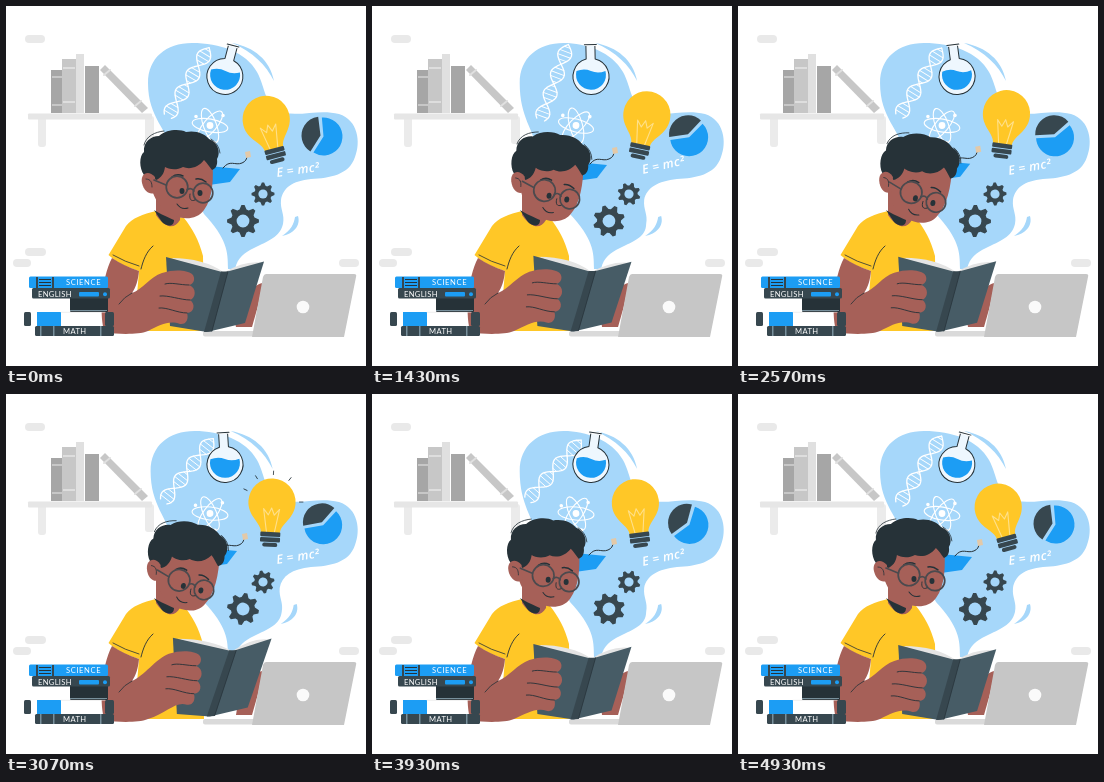
These frames come from a looping animation (360 px wide and 360 px high, 5 s). An HTML page with a canvas:

```html
<!DOCTYPE html>
<html lang="en">
<head>
<meta charset="utf-8">
<title>Studying</title>
<style>
html, body { margin: 0; width: 100%; height: 100%; overflow: hidden; background: #fff; }
canvas { display: block; width: 360px; height: 360px; }
</style>
</head>
<body>
<canvas id="stage"></canvas>
<script>
const LOOP = 5000, TAU = Math.PI * 2;
const canvas = document.getElementById('stage');
const ctx = canvas.getContext('2d');
const ratio = window.devicePixelRatio || 1;
canvas.width = canvas.height = 360 * ratio;

const INK = '#263238', SLATE = '#455a64', STEEL = '#37474f', BLUE = '#1c9df4';
const SKY = '#a6d7fa', YELLOW = '#ffc727', SKIN = '#a66058', WHITE = '#fff';

// Smooth periodic interpolation through six poses
const KEYS = [0, 570, 1430, 2070, 3070, 3930];
function track(values, t) {
  const n = KEYS.length;
  const wrap = k => (k + n) % n;
  const time = k => KEYS[wrap(k)] + LOOP * Math.floor(k / n);
  const slope = k => (values[wrap(k + 1)] - values[wrap(k - 1)]) / (time(k + 1) - time(k - 1));
  let i = n - 1;
  while (KEYS[i] > t) i--;
  const span = time(i + 1) - time(i), u = (t - time(i)) / span, v = 1 - u;
  return values[i] * (1 + 2 * u) * v * v + slope(i) * span * u * v * v
    + values[wrap(i + 1)] * u * u * (3 - 2 * u) - slope(i + 1) * span * u * u * v;
}
const pulse = (t, period) => (1 - Math.cos(TAU * t / period)) / 2;
const rad = deg => deg * Math.PI / 180;

function fill(d, color) {
  ctx.fillStyle = color;
  ctx.fill(new Path2D(d));
}
function line(d, color = INK, width = 1) {
  ctx.strokeStyle = color;
  ctx.lineWidth = width;
  ctx.stroke(new Path2D(d));
}
function box(x, y, w, h, color, r = 0) {
  ctx.fillStyle = color;
  ctx.beginPath();
  ctx.roundRect(x, y, w, h, r);
  ctx.fill();
}
function disc(x, y, r, color) {
  ctx.fillStyle = color;
  ctx.beginPath();
  ctx.arc(x, y, r, 0, TAU);
  ctx.fill();
}
function ring(x, y, rx, ry, turn, color, width) {
  ctx.strokeStyle = color;
  ctx.lineWidth = width;
  ctx.beginPath();
  ctx.ellipse(x, y, rx, ry, turn, 0, TAU);
  ctx.stroke();
}
function text(label, x, y, font, spacing = 0) {
  ctx.font = font;
  ctx.letterSpacing = spacing + 'px';
  ctx.fillStyle = WHITE;
  ctx.fillText(label, x, y);
}
function place(x, y, turn, draw) {
  ctx.save();
  ctx.translate(x, y);
  ctx.rotate(turn);
  draw();
  ctx.restore();
}

function drawRoom() {
  box(19, 29, 20, 8, '#e9e9e9', 4);
  box(19, 242, 21, 8, '#e9e9e9', 4);
  box(7, 253, 18, 8, '#e9e9e9', 4);
  box(333, 253, 20, 8, '#e9e9e9', 4);
  box(32, 110, 8, 31, '#ebebeb', 3);
  box(139, 110, 9, 28, '#ebebeb', 3);
  box(22, 107.5, 124, 6, '#e6e6e6', 1);
  box(45, 64, 11, 43, '#a6a6a6');
  box(46, 70, 10, 2, '#c7c7c7');
  box(46, 98, 10, 2, '#c7c7c7');
  box(56, 53, 14, 54, '#c7c7c7');
  box(57, 61, 12, 2, '#dedede');
  box(57, 95, 12, 2, '#dedede');
  box(70, 48, 8, 59, '#e0e0e0');
  box(79, 60, 14, 47, '#a6a6a6');
  fill('M94 64 L99 59 L142 102 L136 107Z', '#c7c7c7');
  line('M98 69L104 64 M129 100L135 95', '#e0e0e0', 2);
}

function drawBubble(t) {
  const d = 6 * pulse(t, 2500);
  fill(`M${142 + d} 77 C${142 + d} 52 ${160 + d} 37 ${186 + d} 37 C214 37 240 46 251 66
    C260 82 258 102 278 107 C298 110 314 103 333 108 C352 114 355 136 349 151
    C343 169 324 172 305 173 C286 175 ${277 - d / 2} 182 ${275 - d / 2} 194
    C${274 - d / 2} 204 ${279 - d / 2} 208 ${277 - d / 2} 218
    C274 231 262 235 248 242 C238 247 232 251 229 263 H222
    C222 245 221 233 198 208 L165 145 C162 123 ${142 + d} 112 ${142 + d} 77Z`, SKY);
  place(-d / 2, 0, 0, () => {
    fill('M226 37 C248 41 264 54 268 75 C260 59 247 46 226 37Z', SKY);
    fill('M292 210 C295 220 287 228 276 230 C285 224 288 218 289 211Z', SKY);
  });
}

function drawDna(t) {
  place(182.5, 76, rad(31 - 11 * Math.sin(TAU * t / LOOP)), () => {
    const wave = y => 7 * Math.sin((y + 40) / 80 * TAU * 1.9);
    for (const side of [1, -1]) {
      ctx.beginPath();
      for (let y = -40; y <= 40; y += 2) ctx.lineTo(side * wave(y), y);
      ctx.strokeStyle = WHITE;
      ctx.lineWidth = 1.3;
      ctx.stroke();
    }
    for (let y = -37; y < 40; y += 4.6) line(`M${-wave(y)} ${y}H${wave(y)}`, WHITE, 0.9);
  });
}

function drawFlask(t) {
  const tilt = rad(3.5 + 11.5 * Math.cos(TAU * (t + 150) / LOOP));
  place(219, 70, tilt, () => {
    const outline = 'M-4.5 -31 V-17 A18 18 0 1 0 4.5 -17 V-31Z';
    fill(outline, '#eef7fe');
    ctx.save();
    ctx.rotate(-tilt * 0.6);
    fill('M-14.5 -5 Q-7 -8 0 -5 T14.5 -5 A15 15 0 1 1 -14.5 -5Z', BLUE);
    ctx.restore();
    line(outline, INK, 1);
    box(-6, -33, 12, 3, WHITE, 1.5);
    line('M-6 -31.5H6', INK, 1);
  });
}

function drawAtom(t) {
  place(204, 119.5, rad(5 * Math.sin(TAU * t / LOOP)), () => {
    for (const turn of [10, 70, 130]) ring(0, 0, 18, 6.5, rad(turn), WHITE, 1.1);
    disc(0, 0, 3.4, WHITE);
    disc(-14, -9, 1.8, WHITE);
    disc(13, -10, 1.8, WHITE);
    disc(4, 17, 1.8, WHITE);
  });
}

function drawBulb(t) {
  const x = track([270, 268, 267, 264, 264, 268], t);
  const y = track([150, 148, 146, 145, 146, 146.5], t);
  place(x, y, rad(track([-15, -6, 12, 11, 3, -7], t)), () => {
    fill('M-9.5 -7 C-9.5 -17 -23.6 -22 -23.6 -38 A23.6 23.6 0 0 1 23.6 -38 C23.6 -22 9.5 -17 9.5 -7Z', YELLOW);
    line('M-4 -8 L-8 -31 L-3 -25 L0 -32 L3 -25 L8 -31 L4 -8', '#ffe08a', 1.1);
    box(-10, -8, 20, 4.6, STEEL, 1);
    box(-10, -2.6, 20, 4.6, STEEL, 1);
    box(-7.5, 2.8, 15, 4, STEEL, 2);
    const glowing = Math.abs(t % 2500 - 600) < 300;
    if (!glowing) return;
    for (const turn of [-68, -35, 0, 35, 87]) {
      place(0, -38, rad(turn), () => line('M0 -27.5V-31', INK, 0.8));
    }
  });
}

function drawPie(t) {
  const slice = (x, y, r, from, to, color) => {
    ctx.fillStyle = color;
    ctx.beginPath();
    ctx.moveTo(x, y);
    ctx.arc(x, y, r, rad(from), rad(to));
    ctx.fill();
  };
  place(316.5, 130.5, rad(track([0, 22, 50, 58, 48, 22], t)), () => {
    slice(1, 0, 19, -95, 122, BLUE);
    slice(-2, -1, 19, 122, 263, STEEL);
  });
}

function gear(x, y, r, turn) {
  place(x, y, turn, () => {
    ctx.fillStyle = STEEL;
    ctx.beginPath();
    for (let i = 0; i < 32; i++) {
      const a = (i - 0.5) / 32 * TAU, reach = i % 4 < 2 ? r : r * 0.75;
      ctx.lineTo(reach * Math.cos(a), reach * Math.sin(a));
    }
    ctx.fill();
    disc(0, 0, r * 0.4, SKY);
  });
}

function drawIcons(t) {
  drawDna(t);
  drawFlask(t);
  drawAtom(t);
  drawPie(t);
  place(271, track([171, 170, 168, 168, 170, 172], t), rad(track([-8, -11, -13, -12, -9, -12], t)),
    () => text('E = mc²', 0, 0, 'italic 600 12.5px "Open Sans", sans-serif', 0.3));
  const spin = t / LOOP * TAU / 4;
  gear(237, 215, 16, spin);
  gear(257, 188, 11.5, -spin);
  place(track([0, 1, 1, 0, -3, 0], t), track([0, 1, -4, -4, -6, -1], t), 0, () => {
    fill('M203 160 L234 163 L224 176 L203 179Z', BLUE);
    line('M217 162 C224 153 229 160 236 157 Q241 155 241 150', INK, 1);
    fill('M239 146 L244 145 L245 151 L240 152Z', '#e3c9a8');
  });
  drawBulb(t);
}

function drawLaptop() {
  box(197, 325, 60, 5.5, '#dadada', 2);
  fill('M260 268 H348 Q351 268 350 271 L338 331 H246 L257 271 Q258 268 260 268Z', '#c6c6c6');
  disc(297, 301, 6.3, '#fafafa');
}

function drawTorso() {
  fill('M150 205 C137 208 126 212 120 220 L102.5 249 C111 257 123 262 133 265 L128 325 H198 L197 250 C193 234 186 222 178 212Z', YELLOW);
  line('M135 263 C137 255 140 246 147 240', INK, 0.9);
  line('M107 249 Q119 256 133 260', INK, 0.8);
  fill('M150 180 L175 190 L174 214 C168 224 159 222 150 209Z', SKIN);
  fill('M148 204 C154 208 164 212 168 214 C168 221 161 221 156 216Z', INK);
}

function lens(x, y, r) {
  ring(x, y, r, r, 0, '#4b4a4e', 1.7);
}

function drawHead(t) {
  const nod = track([0, 0.41, 0.68, 0.95, 1, 0.1], t);
  const shut = Math.max(0, 1 - Math.abs(t - 570) / 150);
  ctx.save();
  ctx.translate(170 - 0.5 * nod, 212 + 2.5 * nod);
  ctx.rotate(0.145 * nod);
  ctx.translate(-170, -212);
  fill('M149 150 L206 152 C208 172 207 192 198 204 C191 214 177 214 167 209 C158 205 150 196 147 187Z', SKIN);
  fill('M146 187 C141 184 136 175 138 169 C133 162 133 150 138 146 C137 136 145 130 153 130 C161 123 174 123 180 126 C190 124 199 128 203 133 C212 136 215 147 211 153 C212 160 209 163 206 164 C203 160 201 157 198 154 C193 161 184 164 177 161 C170 165 162 163 159 161 C158 168 155 172 150 174 C145 168 140 167 138 171 C138 177 143 182 146 187Z', INK);
  fill('M149 171 C142 163 134 168 136 177 C138 186 145 190 150 186Z', SKIN);
  line('M140 173 C145 173 146 177 146 181', INK, 0.8);
  line('M138 139 C140 130 149 126 158 125 M205 133 Q213 138 214 147', INK, 0.8);
  ctx.translate(-1.5 * nod, 2.5 * nod);
  line('M166 171 Q171 167 177 170 M190 173 Q195 172 200 176', INK, 1.5);
  lens(171, 181, 10.8);
  lens(197, 187, 9.8);
  line('M181 184 Q185 181 188 185 M160 179 L148 174', '#4b4a4e', 1.6);
  for (const [x, y] of [[176, 185], [194, 187]]) {
    if (shut > 0.35) line(`M${x - 4} ${y - 1}Q${x} ${y + 2} ${x + 4} ${y}`, INK, 1.2);
    else {
      ctx.fillStyle = INK;
      ctx.beginPath();
      ctx.ellipse(x, y + nod, 2.5, 3 * (1 - shut), 0, 0, TAU);
      ctx.fill();
    }
  }
  line('M184 188 C183 193 185 196 189 194', INK, 0.9);
  line('M171 198 Q175 204 182 202', INK, 1);
  ctx.restore();
}

function drawReading(t) {
  const p = pulse(t, 1250), a = 7 * p;
  const b = -3 * p - 5 * p * pulse(t, LOOP);
  const rightB = -6 * p + 8 * p * Math.sin(TAU * t / LOOP);
  const spineX = 218 + 1.2 * a, spineY = 266.5 + (b + rightB) / 2;
  const rightX = 258 + 1.1 * a, rightY = 255.5 + rightB;
  const footX = 201 + 0.4 * a, footY = 326 + 0.5 * b;

  fill(`M${228 + a * 0.5} 312 L${242 + a * 0.4} 288 C247 282 252 277 257 277
    L252 300 L246 321 H230Z`, SKIN);
  drawLaptop();

  // A page lifts and turns over once per loop
  const turn = (t - 250) / 640;
  if (turn > 0 && turn < 1) {
    const lift = 15 * Math.sin(Math.PI * turn), x = spineX + 16 - 44 * turn;
    fill(`M${x - 20} ${spineY - 2} Q${x - 13} ${spineY - lift - 5} ${x} ${spineY - lift}
      Q${x + 16} ${spineY - lift - 2} ${x + 20} ${spineY + 5}Z`, '#d5d5d5');
  }
  fill(`M${165 + a} ${252 + b} Q${198 + a} ${252 + b} ${spineX} ${spineY}
    Q${rightX - 20} ${rightY - 1} ${rightX - 3} ${rightY + 1} L${spineX} ${spineY + 6}Z`, '#e4e4e4');
  fill(`M${160 + a} ${251 + b} L${spineX} ${spineY} L${footX} ${footY} L${164 + a} 320Z`, SLATE);
  fill(`M${spineX} ${spineY} L${rightX} ${rightY} L${239 + 0.4 * a} ${317 + 0.5 * b} L${footX} ${footY}Z`, '#475c66');
  fill(`M${spineX - 3} ${spineY - 1} L${spineX + 4} ${spineY - 1} L${footX + 5} ${footY - 0.5} L${footX - 3} ${footY}Z`, STEEL);
  line(`M${spineX + 4} ${spineY - 1} L${footX + 5} ${footY - 1}`, INK, 0.7);

  fill(`M106 252 Q118 260 133 265 C132 275 130 281 126 287 C137 283 ${144 + a} ${271 + b} ${156 + a} ${267 + b}
    C${168 + a} ${263 + b} ${181 + a} ${264 + b} ${186 + a} ${268 + b}
    C${190 + a} ${272 + b} ${188 + a} ${278 + b} ${183 + a} ${279 + b}
    C${191 + a} ${282 + b} ${190 + a} ${292 + b} ${184 + a} ${294 + b}
    C${190 + a} ${298 + b} ${188 + a} ${307 + b} ${181 + a} ${307 + b}
    C${183 + a} ${313 + b} ${180 + a} ${319 + b} ${174 + a} ${318 + b}
    C${163 + a} ${314 + b} ${154 + a} 319 142 325 C132 329 114 328 99 327 C93 313 95 272 106 252Z`, SKIN);
  place(a, b, 0, () => line(
    'M183 279 C174 279 165 276 159 278 M184 294 C175 294 162 289 154 290 M181 307 C171 307 161 301 153 302', INK, 0.9));
  line('M126 287 Q118 291 113 298', INK, 0.8);
}

function drawStack() {
  const label = '7.6px Lato, "Open Sans", sans-serif';
  box(64, 291, 38, 15, INK, 1);
  box(64, 304, 37, 1, '#78909c');
  box(23, 270.5, 79, 11.5, BLUE, 1.5);
  box(30, 271, 2, 11, STEEL);
  box(46, 271, 2, 11, STEEL);
  for (const y of [273, 276, 279]) box(33, y, 12, 1, INK);
  text('SCIENCE', 60, 279.3, label, 0.6);
  box(26, 282, 78, 10.5, STEEL, 1.5);
  text('ENGLISH', 32, 291, label, 0.3);
  box(73, 286, 20, 4.5, BLUE, 1);
  disc(99, 288.3, 2, BLUE);
  box(18, 306, 7, 14, STEEL, 1.5);
  box(31, 306, 24, 14, BLUE);
  box(99, 306, 9, 14, STEEL, 1.5);
  line('M55 306.3H99', '#e4e4e4', 0.6);
  box(29, 320, 79, 10, STEEL, 1.5);
  box(34, 320, 1.5, 10, '#78909c');
  box(47, 320, 1.5, 10, '#78909c');
  box(94, 320, 1.5, 10, '#78909c');
  text('MATH', 57, 328, label, 0.4);
}

function frame(now) {
  const t = now % LOOP;
  ctx.setTransform(ratio, 0, 0, ratio, 0, 0);
  ctx.lineCap = ctx.lineJoin = 'round';
  ctx.fillStyle = WHITE;
  ctx.fillRect(0, 0, 360, 360);
  drawRoom();
  drawBubble(t);
  drawIcons(t);
  drawTorso();
  drawHead(t);
  drawReading(t);
  drawStack();
  requestAnimationFrame(frame);
}
requestAnimationFrame(frame);
</script>
</body>
</html>
```
